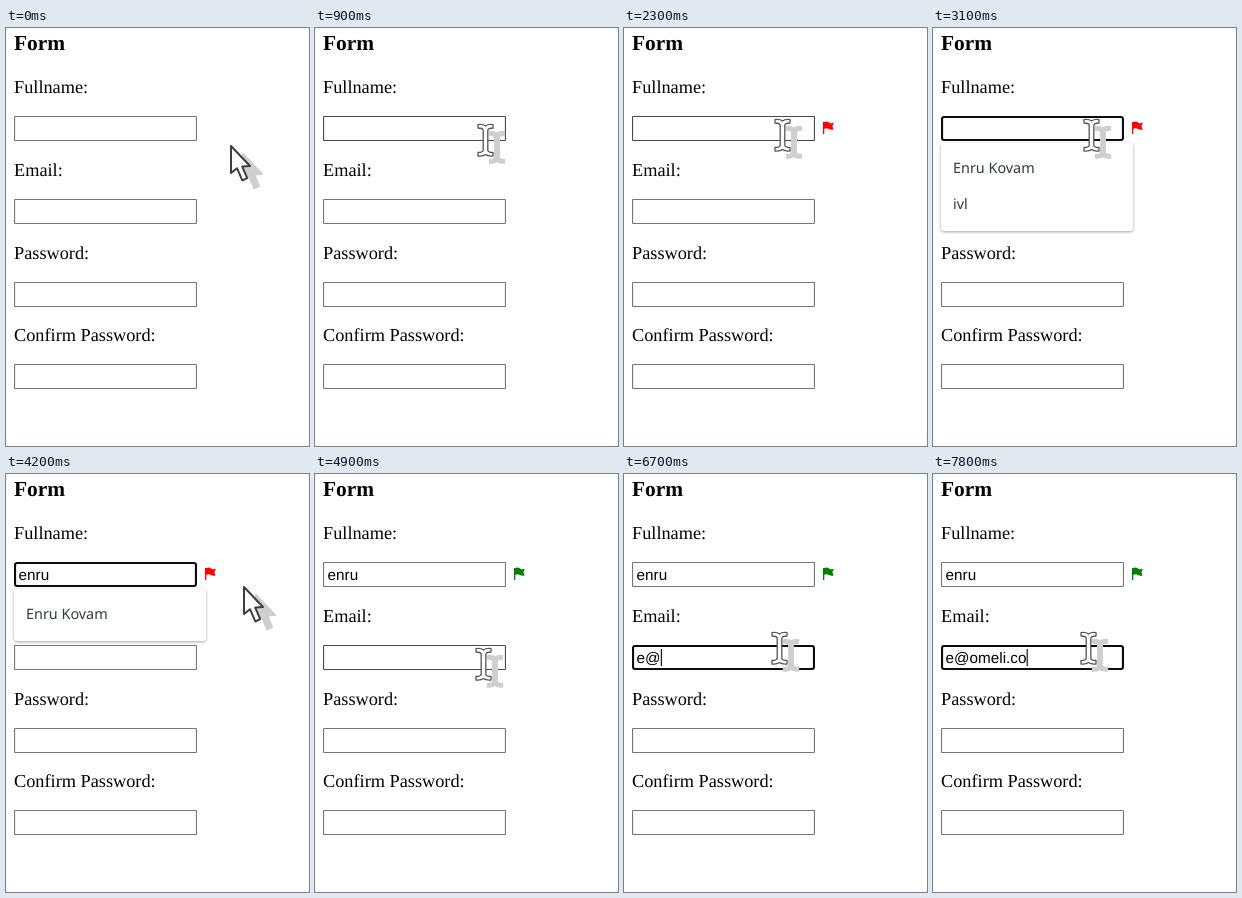
Write an HTML page that moves like this. It is 303 by 418 pixels and loops after 8000 ms.

```html
<!DOCTYPE html>
<html lang="en">
<head>
<meta charset="utf-8">
<title>Form</title>
<style>
  html, body { margin: 0; width: 100%; height: 100%; overflow: hidden; background: #fff; }
  svg { display: block; width: 303px; height: 418px; }
  text { text-rendering: geometricPrecision; white-space: pre; }
  .title { font: bold 21.4px "Liberation Serif", "Times New Roman", serif; }
  .label { font: 18.3px "Liberation Serif", "Times New Roman", serif; }
  .value { font: 15.27px "Liberation Sans", Arial, sans-serif; }
  .item { font: 14.4px "Noto Sans", "Open Sans", sans-serif; fill: #33383c; }
  .box { fill: #fff; stroke: #767676; stroke-width: 1.1; }
  .box.hover { stroke: #4a4a4a; }
  .box.focus { stroke: #0c0c0c; stroke-width: 2.1; }
  .menu rect { fill: #fff; filter: drop-shadow(0 1px 1.5px rgba(0, 0, 0, .36)); }
  .shape { fill: #fff; stroke-linejoin: round; }
  .shadow { fill: #cfcfcf; stroke: #cfcfcf; stroke-linejoin: round; filter: blur(.7px); }
  #arrow { stroke-width: 2; }
  #arrow .shape { stroke: #3d3d41; }
  #beam { stroke-width: 1.3; }
  #beam .shape { stroke: #555; }
</style>
</head>
<body>
<svg id="stage" viewBox="0 0 303 418">
  <defs>
    <path id="arrowPath" d="M1 1V28L7 23.2L12.3 35.3L17.2 33.2L12.2 21.6L20 21Z"/>
    <path id="beamPath" d="M1 1.6Q6 1 8.5 3Q11 1 16 1.6V5Q10.8 5 10.8 7.5V27Q10.8 29.5 16 29.5V33Q11 33.5 8.5 31.5Q6 33.5 1 33V29.5Q6.2 29.5 6.2 27V7.5Q6.2 5 1 5Z"/>
  </defs>
  <text class="title" x="8" y="22">Form</text>
  <g id="fields"></g>
  <path id="flag" d="M199 94H200.3Q203 92.9 205 94.4Q207.4 95.9 210 94.8L208.4 98.2L209.6 101.4Q207 102.3 205 101Q202.8 99.7 200.3 100.8V106H199Z"/>
  <rect id="caret" width="1.1" height="17"/>
  <g id="menus"></g>
  <g id="arrow">
    <use class="shadow" href="#arrowPath" x="12" y="8"/>
    <use class="shape" href="#arrowPath"/>
  </g>
  <g id="beam">
    <use class="shadow" href="#beamPath" x="11.5" y="7"/>
    <use class="shape" href="#beamPath"/>
  </g>
</svg>
<script>
const LOOP = 8000;
const NS = "http://www.w3.org/2000/svg";
const $ = id => document.getElementById(id);

function add(parent, tag, attrs, text = "") {
  const el = document.createElementNS(NS, tag);
  for (const key in attrs) el.setAttribute(key, attrs[key]);
  el.textContent = text;
  parent.append(el);
  return el;
}

const fields = ["Fullname:", "Email:", "Password:", "Confirm Password:"].map((label, i) => {
  const top = Math.round(88.3 + i * 82.6);
  add($("fields"), "text", { class: "label", x: 8, y: top - 23 }, label);
  const box = add($("fields"), "rect", { class: "box" });
  const value = add($("fields"), "text", { class: "value", x: 12.6, y: top + 17.9 });
  return { top, box, value };
});

function makeMenu(top, width, names) {
  const g = add($("menus"), "g", { class: "menu" });
  const panel = add(g, "rect", { x: 8, y: top, width, rx: 3 });
  const items = names.map(name => add(g, "text", { class: "item", x: 20 }, name));
  // Shows the entries that start with the typed text.
  return (opacity, typed) => {
    g.setAttribute("opacity", opacity);
    let count = 0;
    items.forEach((item, i) => {
      const match = names[i].toLowerCase().startsWith(typed);
      item.setAttribute("display", match ? "inline" : "none");
      if (match) item.setAttribute("y", top + 30 + 36 * count++);
    });
    panel.setAttribute("height", 16 + 36 * count);
    g.setAttribute("display", opacity && count ? "inline" : "none");
  };
}

const menus = [
  makeMenu(115, 192, ["Enru Kovam", "ivl"]),
  makeMenu(197, 228, [
    "enrukovam.evm@omeli.com",
    "enrukovam.evm@omeli.com",
    "poms-lab@velmodi.com",
    "enrupelo4@tavelimati.com",
    "erobdunamir@omeli.com"
  ])
];

const arrow = (x, y) => ({ cursor: "arrow", x, y, hover: -1 });
const beam = (x, y, hover) => ({ cursor: "beam", x, y, hover });
const focus = i => ({ focus: i, caret: true });
const blur = { focus: -1, caret: false };

const start = { ...arrow(224, 117), ...blur, name: "", mail: "", menu: 0, open: 0, flag: "none" };

// Each step changes part of the state from its time on.
const steps = [
  [100, arrow(217, 117)],
  [300, arrow(222, 114)],
  [900, beam(162, 95, 0)],
  [1000, focus(0)],
  [1200, { open: .5 }],
  [1300, { open: 1 }],
  [1500, arrow(170, 111)],
  [1600, arrow(250, 123)],
  [1800, { ...blur, flag: "#f00" }],
  [2000, { open: .5 }],
  [2100, { open: 0 }],
  [2200, arrow(205, 106)],
  [2300, beam(150, 90, 0)],
  [2500, { ...focus(0), open: .5 }],
  [2600, { open: 1 }],
  [3100, { caret: false }],
  [3300, { name: "en", caret: true }],
  [3400, { name: "enr" }],
  [3600, { name: "enru" }],
  [4200, { ...arrow(237, 112), caret: false }],
  [4400, { ...arrow(244, 126), ...blur, flag: "#008000", open: .5 }],
  [4500, { open: 0 }],
  [4800, arrow(215, 117)],
  [4900, beam(160, 173, 1)],
  [5000, beam(147, 157, 1)],
  [5100, focus(1)],
  [5300, { menu: 1, open: 1 }],
  [6000, { caret: false }],
  [6300, { mail: "e", caret: true }],
  [6700, { mail: "e@" }],
  ...[..."omeli"].map((_, i) => [6900 + 100 * i, { mail: "e@" + "omeli".slice(0, i + 1) }]),
  [7600, { mail: "e@omeli." }],
  [7800, { mail: "e@omeli.co" }]
];

function stateAt(time) {
  const past = steps.filter(([at]) => at <= time).map(([, change]) => change);
  return Object.assign({}, start, ...past);
}

function render(s) {
  const typed = [s.name, s.mail, "", ""];
  fields.forEach(({ top, box, value }, i) => {
    const on = s.focus === i;
    const inset = on ? 1.05 : .55;
    box.setAttribute("class", "box" + (on ? " focus" : s.hover === i ? " hover" : ""));
    box.setAttribute("x", 8 + inset);
    box.setAttribute("y", top + inset);
    box.setAttribute("width", 183 - 2 * inset);
    box.setAttribute("height", 25 - 2 * inset);
    box.setAttribute("rx", on ? 2 : .5);
    value.textContent = typed[i];
  });

  $("caret").setAttribute("display", s.caret ? "inline" : "none");
  if (s.caret) {
    const { top, value } = fields[s.focus];
    const width = typed[s.focus] ? value.getComputedTextLength() : 0;
    $("caret").setAttribute("x", 12.8 + width);
    $("caret").setAttribute("y", top + 4);
  }

  $("flag").setAttribute("fill", s.flag);
  menus.forEach((show, i) => show(i === s.menu ? s.open : 0, typed[i]));
  for (const id of ["arrow", "beam"]) {
    $(id).setAttribute("display", s.cursor === id ? "inline" : "none");
    $(id).setAttribute("transform", `translate(${s.x} ${s.y})`);
  }
}

const begin = performance.now();
function tick() {
  render(stateAt((performance.now() - begin) % LOOP));
  requestAnimationFrame(tick);
}
tick();
</script>
</body>
</html>
```
